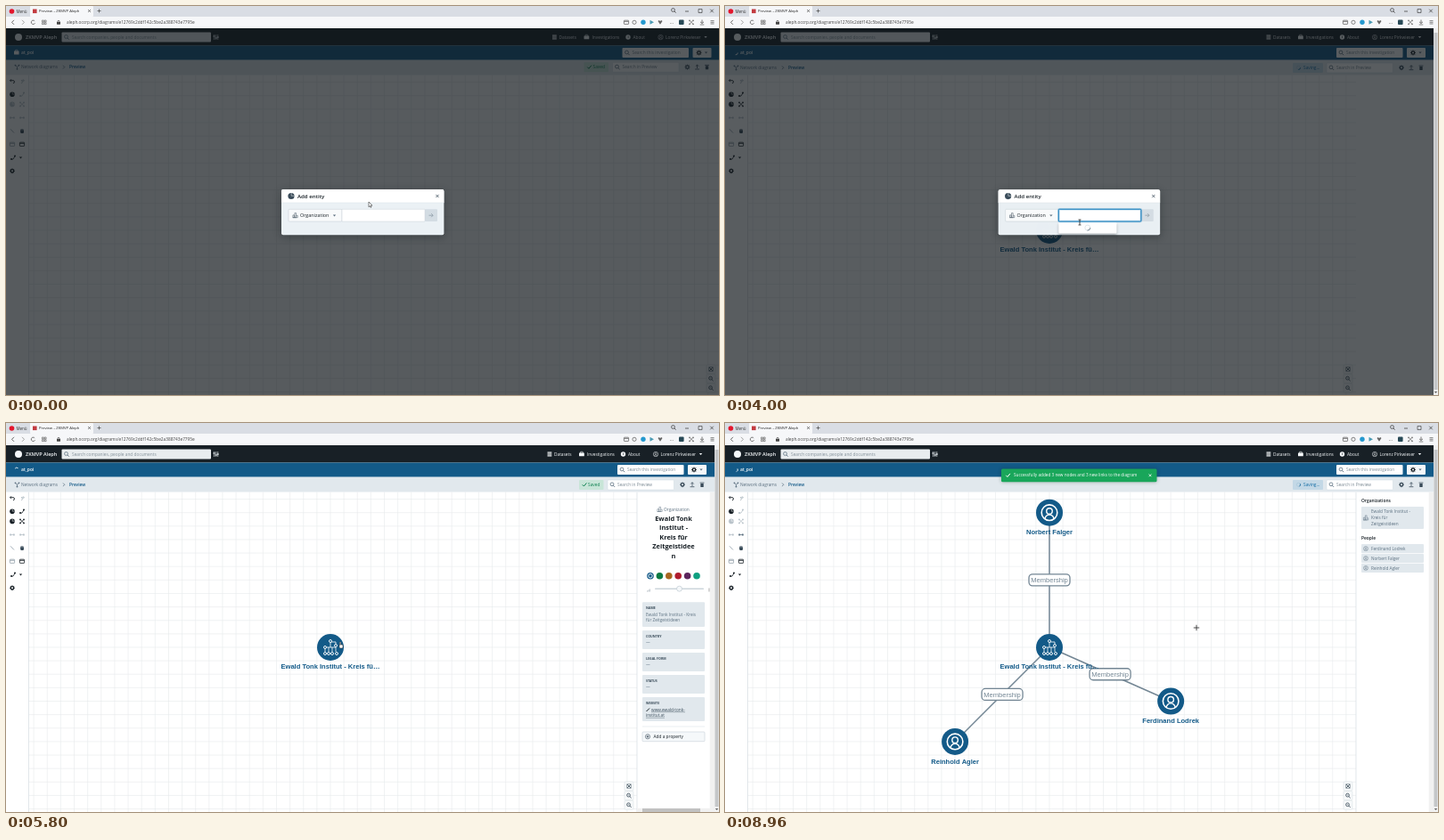
Write an HTML page with a canvas that moves like this. It is 800x437 px and loops after 9000 ms.

```html
<!DOCTYPE html>
<html lang="en">
<head>
<meta charset="utf-8">
<title>Network diagram</title>
<style>
html, body { margin: 0; width: 100%; height: 100%; overflow: hidden; background: #fff; }
canvas { display: block; width: 800px; height: 437px; }
</style>
</head>
<body>
<canvas id="stage" width="800" height="437"></canvas>
<script>
const ctx = document.getElementById('stage').getContext('2d');
const LOOP = 9000;
const UI = '"Open Sans", sans-serif';
const ARIAL = '"Liberation Sans", Arial, sans-serif';
const INK = '#182026', GREY = '#5c7080', PALE = '#b9c3ca', BLUE = '#135a88', CARD = '#e1e8ed';
const UNIT = 15.13, HUB = { x: 364, y: 252 };
const ORG = 'Ewald Tonk Institut - Kreis für Zeitgeistideen';
const PEOPLE = [
  { name: 'Norbert Falger', gx: 0, gy: -10 },
  { name: 'Ferdinand Lodrek', gx: 9, gy: 4 },
  { name: 'Reinhold Agler', gx: -7, gy: 7 }
].map(p => ({ ...p, x: HUB.x + p.gx * UNIT, y: HUB.y + p.gy * UNIT }));

// Moments of the story, in ms
const T = { beam: 1120, focus: 1400, paste: 2440, added: 3100, scrollbar: 3280, close: 4000,
  saved: 5200, menu: 6080, pick: 7520, found: 7960 };

const clamp = v => Math.max(0, Math.min(1, v));
const easeOut = v => 1 - (1 - clamp(v)) ** 3;
const smooth = v => { v = clamp(v); return v * v * (3 - 2 * v); };

function box(x, y, w, h, fill, r = 0, stroke, lw = .6) {
  ctx.beginPath();
  ctx.roundRect(x, y, w, h, r);
  if (fill) { ctx.fillStyle = fill; ctx.fill(); }
  if (stroke) { ctx.strokeStyle = stroke; ctx.lineWidth = lw; ctx.stroke(); }
}
function disc(x, y, r, fill, stroke, lw = .8) {
  ctx.beginPath();
  ctx.arc(x, y, r, 0, Math.PI * 2);
  if (fill) { ctx.fillStyle = fill; ctx.fill(); }
  if (stroke) { ctx.strokeStyle = stroke; ctx.lineWidth = lw; ctx.stroke(); }
}
function arc(x, y, r, a, b, color, lw = .8) {
  ctx.beginPath();
  ctx.arc(x, y, r, a, b);
  ctx.strokeStyle = color; ctx.lineWidth = lw; ctx.stroke();
}
function line(color, lw, ...p) {
  ctx.beginPath();
  for (let i = 0; i < p.length; i += 2) ctx.lineTo(p[i], p[i + 1]);
  ctx.strokeStyle = color; ctx.lineWidth = lw; ctx.stroke();
}
function poly(color, ...p) {
  ctx.beginPath();
  for (let i = 0; i < p.length; i += 2) ctx.lineTo(p[i], p[i + 1]);
  ctx.closePath(); ctx.fillStyle = color; ctx.fill();
}
function text(s, x, y, size = 4.8, color = INK, weight = 400, align = 'left', family = UI) {
  ctx.font = `${weight} ${size}px ${family}`;
  ctx.textAlign = align;
  ctx.textBaseline = 'alphabetic';
  ctx.fillStyle = color;
  ctx.fillText(s, x, y + size * .35);
}
function spinner(x, y, r, t, color, track) {
  if (track) disc(x, y, r, null, track, .9);
  const a = t / 500 * Math.PI * 2;
  arc(x, y, r, a, a + 1.7, color, .9);
}

const icon = {
  search(x, y, c) { disc(x - .5, y - .5, 1.9, null, c, .8); line(c, .9, x + .9, y + .9, x + 2.6, y + 2.6); },
  caret(x, y, c) { poly(c, x - 1.7, y - .9, x + 1.7, y - .9, x, y + 1.1); },
  gear(x, y, c) {
    disc(x, y, 1.7, null, c, 1.3);
    for (let i = 0; i < 8; i++) {
      const u = Math.cos(i * Math.PI / 4), v = Math.sin(i * Math.PI / 4);
      line(c, .9, x + u * 1.9, y + v * 1.9, x + u * 2.9, y + v * 2.9);
    }
  },
  cross(x, y, c, r = 1.6) { line(c, .8, x - r, y - r, x + r, y + r); line(c, .8, x + r, y - r, x - r, y + r); },
  plus(x, y, c, r = 2) { line(c, .8, x - r, y, x + r, y); line(c, .8, x, y - r, x, y + r); },
  tick(x, y, c) { line(c, 1, x - 2.2, y, x - .6, y + 1.7, x + 2.4, y - 1.9); },
  pie(x, y, c, r = 2.8) {
    disc(x, y, r, c);
    line('#fff', .5, x + .2, y - r, x + .2, y - .2, x + r, y - .2);
  },
  person(x, y, c, r = 2.5) {
    disc(x, y, r, null, c, r * .18);
    disc(x, y - r * .2, r * .37, null, c, r * .16);
    arc(x, y + r * .85, r * .58, Math.PI, Math.PI * 2, c, r * .16);
  },
  org(x, y, c) {
    box(x - 2.6, y - .3, 1.7, 2.8, null, 0, c, .5);
    box(x - .6, y - 2.6, 1.7, 5.1, null, 0, c, .5);
    line(c, .5, x + 1.2, y + .2, x + 2.7, y + .2, x + 2.7, y + 2.5, x - 2.8, y + 2.5);
  },
  link(x, y, c) {
    line(c, .8, x - 2, y + 1.8, x, y + 1.8, x + 2, y - 1.6);
    disc(x - 2, y + 1.8, 1, c); disc(x + 2, y - 1.8, 1, c);
  },
  expand(x, y, c) {
    icon.cross(x, y, c, 2);
    for (const [u, v] of [[-1, -1], [1, -1], [-1, 1], [1, 1]]) disc(x + u * 2, y + v * 2, .9, c);
  },
  diagram(x, y, c) {
    line(c, .8, x - 2, y - 2, x, y, x + 2, y - 2); line(c, .8, x, y, x, y + 2.4);
    for (const [u, v] of [[-2, -2], [2, -2], [0, 2.2]]) disc(x + u, y + v, .9, c);
  },
  frame(x, y, c) { box(x - 2.6, y - 2.1, 5.2, 4.2, null, .5, c, .8); line(c, .8, x - 2.5, y - .9, x + 2.5, y - .9); },
  joined(x, y, c) { line(c, .7, x - 2, y, x + 2, y); box(x - 2.8, y - 1, 2, 2, c, .5); box(x + .8, y - 1, 2, 2, c, .5); },
  upload(x, y, c) { line(c, .8, x, y + 1.5, x, y - 2.4); line(c, .8, x - 1.7, y - .9, x, y - 2.6, x + 1.7, y - .9); line(c, .8, x - 2.4, y + 2.4, x + 2.4, y + 2.4); },
  trash(x, y, c) { box(x - 1.7, y - 1.3, 3.4, 4, c, .5); line(c, .8, x - 2.4, y - 2.2, x + 2.4, y - 2.2); },
  turn(x, y, c, d) { line(c, .9, x - d * 2.4, y - 1, x + d, y - 1); arc(x + d, y + .5, 1.5, -1.6, 1.6, c, .9); line(c, .8, x - d, y - 2.5, x - d * 2.5, y - 1, x - d, y + .5); },
  hand(x, y, c) { box(x - 1.8, y - .6, 3.8, 3.2, c, 1.2); for (let i = 0; i < 4; i++) box(x - 1.8 + i, y - 2.4 + Math.abs(i - 1.5) * .4, .7, 3, c, .3); }
};

function browser() {
  box(0, 0, 800, 12, '#d9dde4');
  box(27, 0, 71, 12, '#f6f7f9', 1);
  box(0, 12, 800, 13, '#f6f7f9');
  disc(6.5, 6, 2.8, '#e3172d');
  text('Menü', 11.5, 6, 4.5, '#333');
  box(30, 3.5, 4.6, 4.6, '#c23b40');
  text('Preview – ZKMVP Aleph', 37, 6, 4.2, '#222');
  icon.cross(93.5, 5.5, '#444', 1.3);
  icon.plus(104.5, 5.5, '#555');
  icon.search(749, 5, '#444');
  line('#444', .8, 762, 6, 766, 6);
  box(777, 3.5, 4, 4, null, 0, '#444', .7);
  icon.cross(792, 5.5, '#444', 1.8);
  line('#555', .9, 9, 15.8, 6.5, 18.3, 9, 20.8);
  line('#999', .9, 18, 15.8, 20.5, 18.3, 18, 20.8);
  arc(30.5, 18.3, 2.2, .4, 5.6, '#555', .8);
  for (const x of [40.5, 43.2]) for (const y of [16, 18.7]) box(x, y, 1.9, 1.9, null, 0, '#555', .6);
  box(57, 17.7, 4, 3, '#444', .4); arc(59, 17.6, 1.2, Math.PI, Math.PI * 2, '#444', .7);
  text('aleph.occrp.org/diagrams/e12769c2ddf142c5be2a388743e7795e', 68, 18.3, 4.75, '#444');
  icon.frame(696, 18.3, '#666'); disc(705, 18.3, 2.1, null, '#666');
  disc(715, 18.3, 2.7, '#2498cf');
  poly('#4b9bb4', 722.5, 15.8, 727, 18.3, 722.5, 20.8);
  poly('#666', 731.5, 17, 732.7, 16, 734, 17, 735.3, 16, 736.5, 17, 734, 20.7);
  text('...', 747, 18, 4.8, '#666', 600, 'center');
  box(755, 15.5, 5.6, 5.6, '#274956', 1);
  icon.expand(769, 18.3, '#777');
  line('#555', .8, 781, 15.5, 781, 19.4); line('#555', .8, 779, 17.8, 781, 19.6, 783, 17.8);
  line('#555', .7, 778.7, 21, 783.3, 21);
  for (let i = -1; i < 2; i++) line('#555', .7, 790.5, 18.3 + i * 1.7, 794.5, 18.3 + i * 1.7);
}

function header(t) {
  const dx = t < T.scrollbar ? 5.5 : 0;
  box(0, 25, 800, 19.5, INK);
  box(0, 44.5, 800, 16, BLUE);
  disc(14, 35, 4, '#f5f8fa');
  text('ZKMVP Aleph', 22, 35, 5.5, '#f5f8fa', 600);
  box(62.5, 29.5, 167.5, 11, '#e9edef', 1);
  icon.search(68, 35, GREY);
  text('Search companies, people and documents', 74, 35, 4.8, '#83909a');
  for (const [i, k] of [-1, 1, 0].entries()) {
    line('#dce3e7', .7, 233.5 + i * 2.1, 32, 233.5 + i * 2.1, 38);
    disc(233.5 + i * 2.1, 35 + k, 1, '#dce3e7');
  }
  if (t < 2320) {
    box(9, 50.5, 5.6, 4, '#fff', .5); box(10.5, 49.3, 2.6, 2, null, .4, '#fff', .6);
  } else spinner(12, 52.5, 2.3, t, '#fff');
  text('at_poi', 17, 52.3, 4.9, '#fff', 600);

  ctx.save();
  ctx.translate(dx, 0);
  for (let i = 0; i < 3; i++) box(607.5, 32.5 + i * 1.9, 4.8, 1.2, '#f5f8fa');
  text('Datasets', 615, 35, 4.8, '#f5f8fa');
  box(643, 33.5, 5.8, 3.8, '#f5f8fa', .5); box(644.5, 32.3, 2.8, 2, null, .4, '#f5f8fa', .6);
  text('Investigations', 652, 35, 4.8, '#f5f8fa');
  disc(692.5, 35, 2.7, '#f5f8fa'); text('i', 692.5, 35, 4, INK, 700, 'center');
  text('About', 698, 35, 4.8, '#f5f8fa');
  icon.person(729, 35, '#f5f8fa', 2.7);
  text('Lorenz Pirkwieser', 734.5, 35, 4.8, '#f5f8fa');
  icon.caret(779.5, 35, '#f5f8fa');
  box(686, 47, 74.5, 11, '#fff', 1);
  icon.search(691.5, 52.5, GREY);
  text('Search this investigation', 697, 52.5, 4.8, '#7b8994');
  box(765, 47, 21, 11, '#f5f8fa', 1);
  icon.gear(772, 52.5, INK); icon.caret(780, 52.5, GREY);
  ctx.restore();
}

function crumbs(t) {
  const dx = t < T.scrollbar ? 5.5 : 0, y = t < T.scrollbar ? 68.6 : 69.3;
  box(0, 60.5, 800, 17, CARD);
  icon.diagram(12.5, y, GREY);
  text('Network diagrams', 17, y, 4.8, GREY);
  line(GREY, .8, 64, y - 1.8, 65.8, y, 64, y + 1.8);
  text('Preview', 71, y, 4.8, BLUE, 600);
  ctx.save();
  ctx.translate(dx, y - 69.3);
  if ((t >= T.added && t < T.saved) || t >= T.found) {
    box(637, 64, 34, 11, '#c3d8e6', 1);
    spinner(643.5, 69.3, 2.1, t, '#1f6c9d', '#aecbdd');
    text('Saving...', 649, 69.3, 4.8, '#106ba3');
  } else {
    box(643, 64, 27.5, 11, '#c8e5d8', 1);
    icon.tick(649, 69.3, '#0d8050');
    text('Saved', 653, 69.3, 4.8, '#0d8050');
  }
  box(675, 64, 74.5, 11, '#fff', 1, '#ced9e0', .5);
  icon.search(680.5, 69.3, GREY);
  text('Search in Preview', 686, 69.3, 4.8, '#7b8994');
  icon.gear(759, 69.3, '#394b59'); icon.upload(770, 69.3, '#394b59'); icon.trash(781, 69.3, '#394b59');
  ctx.restore();
}

function tools(t) {
  const one = t >= T.added && t < T.found ? INK : PALE;
  box(0, 77.5, 25.5, 360, '#fff');
  line('#d5dce1', .7, 25.5, 77.5, 25.5, 437);
  icon.turn(7, 84.7, INK, 1); icon.turn(18, 84.7, PALE, -1);
  icon.pie(7, 99.3, INK); icon.link(18, 99.3, one);
  icon.pie(7, 110.4, one); icon.expand(18, 110.4, one);
  icon.joined(7, 125.5, PALE); icon.joined(18, 125.5, t >= T.found ? GREY : PALE);
  line('#96a3ad', .9, 5, 138.3, 9, 142.5); icon.hand(18, 140.3, '#394b59');
  icon.frame(7, 155.3, '#96a3ad'); icon.frame(18, 155.3, INK);
  icon.link(8, 170.3, INK); icon.caret(16.5, 170.3, INK);
  icon.gear(7, 185.3, INK);
}

function label(s, x, y) { text(s, x, y, 7.55, BLUE, 700, 'center', ARIAL); }

function hubIcon(x, y) {
  const w = '#fff';
  line(w, .8, x, y - 6, x, y, x - 6, y, x - 6, y + 5);
  line(w, .8, x, y, x + 6, y, x + 6, y + 5);
  line(w, .8, x - 2, y, x - 2, y + 5); line(w, .8, x + 2, y, x + 2, y + 5);
  line(w, .8, x, y - 6, x + 6, y - 6, x + 6, y - 2);
  for (const [u, v] of [[0, -7], [6, -2], [-6, 0], [-6, 7], [-2, 7], [2, 7], [7, 7]])
    disc(x + u, y + v, 1.5, BLUE, w, .9);
}

function diagram(t) {
  const right = t < T.added ? 800 : 708;
  ctx.save();
  ctx.beginPath(); ctx.rect(25.5, 77.5, right - 25.5, 360); ctx.clip();
  box(25.5, 77.5, 775, 360, '#fff');
  for (let k = -23; k < 30; k++) line('#e6e9eb', .6, HUB.x + k * UNIT, 77, HUB.x + k * UNIT, 437);
  for (let k = -12; k < 13; k++) line('#e6e9eb', .6, 25, HUB.y + k * UNIT, 800, HUB.y + k * UNIT);
  if (t >= T.found) {
    for (const p of PEOPLE) line('#738694', 1.5, HUB.x, HUB.y, p.x, p.y);
    for (const p of PEOPLE) {
      const x = (HUB.x + p.x) / 2, y = (HUB.y + p.y) / 2;
      box(x - 23, y - 6.5, 46, 13, '#fff', 4, '#738694', 1.3);
      text('Membership', x, y, 7.55, '#738694', 400, 'center', ARIAL);
    }
    for (const p of PEOPLE) {
      disc(p.x, p.y, 15, BLUE);
      icon.person(p.x, p.y, '#fff', 8.8);
      label(p.name, p.x, p.y + 22);
    }
  }
  if (t >= T.added) {
    disc(HUB.x, HUB.y, 15, BLUE);
    hubIcon(HUB.x, HUB.y);
    if (t >= T.menu && t < T.found) box(307, 269.5, 20.5, 8.6, '#b5d5ec');
    label(ORG.slice(0, 30) + '…', HUB.x, 273.8);
  }
  ctx.restore();
  const zx = t < T.added ? 791 : 699;
  for (let i = 0; i < 3; i++) {
    const y = 408 + i * 10.6;
    box(zx - 5, y - 5, 10, 10, '#f8fafb', 1, '#d3dadf', .5);
    if (i) { icon.search(zx, y, '#394b59'); line('#394b59', .5, zx - 1.5, y - .5, zx + .5, y - .5); }
    else { icon.cross(zx, y, '#394b59', 2); box(zx - 2.3, y - 2.3, 4.6, 4.6, null, 0, '#394b59', .5); }
  }
}

function entityPanel() {
  icon.org(733.5, 97, GREY);
  text('Organization', 738, 97, 4.8, GREY);
  ['Ewald Tonk', 'Institut -', 'Kreis für', 'Zeitgeistidee', 'n'].forEach((s, i) =>
    text(s, 749, 107 + i * 10.5, 7.4, INK, 700, 'center'));
  ['#135a88', '#0d7a43', '#a8661f', '#b01b2e', '#5c255c', '#0f9f80'].forEach((c, i) =>
    disc(723 + i * 10.4, 171.8, 3.8, c));
  disc(723, 171.8, 2.2, null, '#fff', .9);
  for (let i = 0; i < 3; i++) line('#9aa7b0', .7, 719.5 + i * 1.4, 189.5, 719.5 + i * 1.4, 188.5 - i);
  box(728, 185.5, 55, 1.4, '#ccd5db', .7);
  disc(755.5, 186.2, 3, '#f5f8fa', '#b8c3cb', .6);
  line('#888', .8, 789, 185.5, 789, 189.5);
  const card = (y, h, title, ...rows) => {
    box(714, y, 70, h, CARD, 1);
    text(title, 718, y + 6.5, 3.6, '#394b59', 700);
    rows.forEach((s, i) => text(s, 718, y + 13.8 + i * 6.6, 4.7, GREY));
  };
  card(201.3, 27.8, 'NAME', 'Ewald Tonk Institut - Kreis', 'für Zeitgeistideen');
  card(233, 21, 'COUNTRY', '—');
  card(258, 21, 'LEGAL FORM', '—');
  card(283, 21, 'STATUS', '—');
  card(308, 27, 'WEBSITE');
  line(INK, 1, 718.5, 324, 722, 320.5);
  text('www.ewald-tonk-', 724, 322, 4.7, '#394b59');
  text('institut.at', 718, 328.5, 4.7, '#394b59');
  line('#394b59', .4, 724, 324.7, 762, 324.7); line('#394b59', .4, 718, 331.2, 739, 331.2);
  line('#dce3e7', .6, 714, 341, 784, 341);
  box(714, 347, 70, 10.7, '#f5f8fa', 1, '#c8d1d8', .6);
  disc(720, 352.3, 2.6, null, '#394b59', .6); icon.plus(720, 352.3, '#394b59', 1.4);
  text('Add a property', 726.5, 352.3, 4.8);
}

function groupPanel() {
  text('Organizations', 714, 87.5, 4.9, INK, 600);
  box(714, 94, 70, 25, CARD, 1);
  icon.org(719, 106.5, GREY);
  ['Ewald Tonk Institut -', 'Kreis für', 'Zeitgeistideen'].forEach((s, i) => text(s, 725, 99.3 + i * 7, 4.7, GREY));
  text('People', 714, 129.5, 4.9, INK, 600);
  PEOPLE.map(p => p.name).sort().forEach((s, i) => {
    box(714, 136 + i * 10.9, 70, 10.2, CARD, 1);
    icon.person(719, 141.1 + i * 10.9, GREY);
    text(s, 725, 141.1 + i * 10.9, 4.7, GREY);
  });
}

function panel(t) {
  if (t < T.added) return;
  box(708, 77.5, 92, 360, '#fff');
  ctx.save();
  ctx.beginPath(); ctx.rect(700, 77.5, 95, 360); ctx.clip();
  ctx.translate(87 * (1 - easeOut((t - T.close) / 300)), 0);
  box(708, 77.5, 92, 360, '#fff');
  line('#d5dce1', .7, 708, 77.5, 708, 437);
  t < T.found ? entityPanel() : groupPanel();
  if (t < T.found) { box(708, 432.7, 87, 4.3, '#f1f1f1'); box(714, 433, 65, 4, '#c1c1c1'); }
  box(789.7, 77.5, 5.3, 360, '#f1f1f1');
  ctx.restore();
}

function dialog(t) {
  const out = easeOut((t - T.close) / 300);
  if (out >= 1) return;
  ctx.save();
  ctx.globalAlpha = 1 - out;
  box(0, 25, 800, 412, 'rgba(16,22,26,.7)');
  ctx.translate(400.2 - (t < T.scrollbar ? 0 : 2.8), 231.5);
  ctx.scale(1 - out / 2, 1 - out / 2);
  ctx.translate(-400.2, -231.5);
  ctx.shadowColor = 'rgba(16,22,26,.4)'; ctx.shadowBlur = 8; ctx.shadowOffsetY = 2;
  box(309, 206, 182.4, 51.3, '#ebf1f5', 2);
  ctx.shadowColor = 'transparent';
  box(309, 206, 182.4, 15, '#fff', [2, 2, 0, 0]);
  line('#d8e0e5', .5, 309, 221, 491.4, 221);
  icon.pie(320, 213.5, '#394b59', 3.6);
  text('Add entity', 327, 213.5, 6.1, INK, 600);
  icon.cross(484, 213.5, '#394b59');
  box(317, 228.3, 60, 13.8, '#f8fafb', 1, '#c9d2d9', .6);
  icon.org(324.5, 235.2, '#394b59');
  text('Organization', 330, 235.2, 5.4);
  icon.caret(368.5, 235.3, GREY);
  box(470, 228.3, 14, 13.8, '#d3dce3', 1);
  line('#8d9ba6', .8, 474.5, 235.2, 479, 235.2); line('#8d9ba6', .8, 477.2, 233.2, 479.2, 235.2, 477.2, 237.2);
  box(377, 228.3, 93, 13.8, '#fff', 0, '#c9d2d9', .5);
  if (t >= T.focus) {
    ctx.shadowColor = 'rgba(16,22,26,.3)'; ctx.shadowBlur = 3;
    box(377, 243, 65.5, 12.5, '#fff', 1);
    ctx.shadowColor = 'transparent';
    spinner(409.7, 249.2, 3, t, '#6d7f8c', '#dde4e8');
    box(377, 228.3, 93, 13.8, null, 1, 'rgba(19,124,189,.3)', 2.4);
    box(377, 228.3, 93, 13.8, null, 1, '#137cbd', .9);
    const pasted = t >= T.paste && t < T.added;
    if (pasted) {
      ctx.save();
      ctx.beginPath(); ctx.rect(379, 229, 89, 12); ctx.clip();
      text(ORG, 467, 235.2, 5.4, INK, 400, 'right');
      ctx.restore();
    }
    const phase = ((t - 1900) % 1060 + 1060) % 1060, cx = pasted ? 467.6 : 380.7;
    if (phase < 530) line(INK, .7, cx, 232, cx, 239);
  }
  ctx.restore();
}

function menu(t) {
  const a = clamp((t - T.menu) / 100) * (1 - clamp((t - T.pick) / 100));
  if (!a) return;
  ctx.save();
  ctx.globalAlpha = a;
  ctx.shadowColor = 'rgba(16,22,26,.35)'; ctx.shadowBlur = 5; ctx.shadowOffsetY = 1;
  box(373, 205, 69, 40, '#fff', 1);
  ctx.shadowColor = 'transparent';
  icon.link(380, 212, '#394b59'); text('Add link', 385.5, 212);
  line('#dbe1e5', .6, 373, 219, 442, 219);
  if (t > 6500) box(375, 221.7, 65, 10.5, '#d3dadf', 1);
  icon.expand(380, 227, GREY); text('Discover all links', 385.5, 227);
  disc(380, 238, 2.4, null, GREY, .6); disc(380, 238, 1, null, GREY, .6);
  text('Discover members', 385.5, 238);
  for (const y of [227, 238]) {
    box(430, y - 3.8, 8, 7.6, '#bfc9d0', 2);
    text('3', 434, y, 4.2, INK, 400, 'center');
  }
  ctx.restore();
}

function toast(t) {
  const k = easeOut((t - T.found - 80) / 300);
  if (!k) return;
  ctx.save();
  ctx.globalAlpha = k;
  ctx.translate(0, 16 * (k - 1));
  ctx.shadowColor = 'rgba(16,22,26,.3)'; ctx.shadowBlur = 4;
  box(310, 51.5, 174.5, 14.7, '#19a65a', 1.5);
  ctx.shadowColor = 'transparent';
  icon.tick(317.5, 58.8, '#fff');
  text('Successfully added 3 new nodes and 3 new links to the diagram', 324, 58.8, 4.7, '#fff');
  icon.cross(477, 58.8, '#fff', 1.4);
  ctx.restore();
}

const PATH = [[0, 407, 220], [600, 402, 231], [880, 401, 230], [1119, 401, 234], [1120, 398, 243], [4060, 398, 243],
  [4160, 394, 239], [4700, 394, 239], [5500, 375, 246], [6200, 375, 246], [6900, 400, 228],
  [7700, 400, 228], [8500, 529, 230], [9000, 529, 230]];

function cursor(t) {
  const i = Math.max(1, PATH.findIndex(p => t < p[0]));
  const [t0, x0, y0] = PATH[i - 1], [t1, x1, y1] = PATH[i];
  const k = smooth((t - t0) / (t1 - t0)), x = x0 + (x1 - x0) * k, y = y0 + (y1 - y0) * k;
  if (t >= T.beam && t < 4080) {
    line('#222', .8, x, y - 3, x, y + 3);
    line('#222', .7, x - 1.5, y - 3, x + 1.5, y - 3); line('#222', .7, x - 1.5, y + 3, x + 1.5, y + 3);
  } else if (t >= 7700) {
    icon.plus(x, y, '#222', 3.2);
  } else if (t >= 5300) {
    box(x - .6, y, 1.3, 5, '#fff', .6, '#222', .5);
    box(x - 1, y + 3, 4, 4, '#fff', 1, '#222', .5);
  } else {
    ctx.lineJoin = 'round';
    const p = [x, y, x, y + 5.8, x + 1.3, y + 4.6, x + 2.2, y + 6.4, x + 3, y + 6, x + 2.2, y + 4.2, x + 4, y + 4.1];
    poly('#fff', ...p);
    line('#333', .6, ...p, x, y);
  }
}

function draw(t) {
  ctx.clearRect(0, 0, 800, 437);
  diagram(t);
  panel(t);
  tools(t);
  crumbs(t);
  header(t);
  menu(t);
  toast(t);
  dialog(t);
  if (t >= T.scrollbar) {
    box(795, 25, 5, 412, '#f1f1f1');
    box(795.5, 30, 4, 401, '#c4c6c8');
    icon.caret(797.5, 434, '#666');
  }
  browser();
  cursor(t);
}

const start = performance.now();
function tick() {
  draw((performance.now() - start) % LOOP);
  requestAnimationFrame(tick);
}
tick();
</script>
</body>
</html>
```
